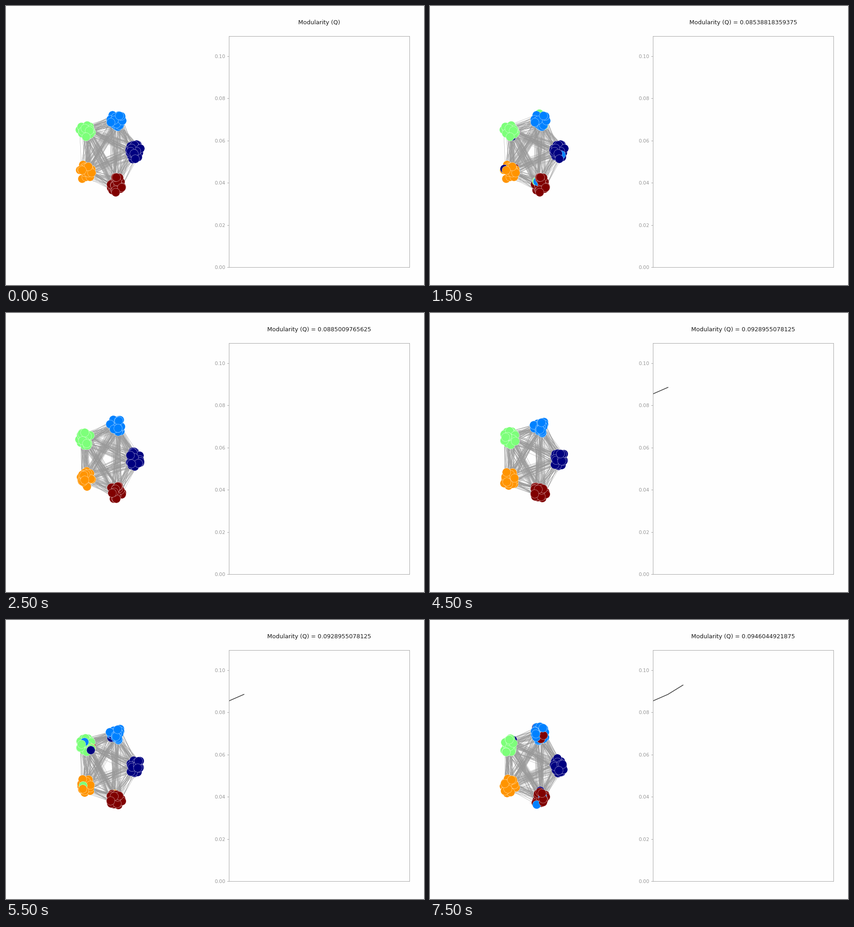
These frames come from a looping animation (917 by 611 pixels, 8000 ms). A matplotlib script:

```python
import numpy as np
import matplotlib.pyplot as plt
from matplotlib.animation import FuncAnimation
from matplotlib.collections import LineCollection

W, H, DPI = 917, 611, 76.4
GROUPS, NODES, EDGES, STRAYS = 5, 128, 640, 11
GREY = "#999999"
BACK = "#fefefe"
Q = [0.08538818359375, 0.0885009765625, 0.0928955078125, 0.0946044921875]
HOME = np.arange(NODES) % GROUPS


def scatter_in(groups, rng):
    """Random places in the oval of each node's group, on a tall pentagon."""
    turn = 2 * np.pi * groups / GROUPS
    angle = rng.uniform(0, 2 * np.pi, len(groups))
    reach = np.sqrt(rng.random(len(groups)))
    x = 223 + 60 * np.cos(turn) + 14 * reach * np.cos(angle)
    y = 319.5 - 75 * np.sin(turn) + 17.5 * reach * np.sin(angle)
    return np.column_stack([x, y])


def layout(step):
    return max(step - 1, 0) // 2


def node_places(step):
    """Settled layout; in restless steps a few nodes visit another group."""
    places = scatter_in(HOME, np.random.default_rng(layout(step)))
    if step == 1 or step and step % 2 == 0:
        rng = np.random.default_rng(100 + step)
        strays = rng.choice(NODES, STRAYS, replace=False)
        hosts = (HOME[strays] + rng.integers(1, GROUPS, STRAYS)) % GROUPS
        places[strays] = scatter_in(hosts, rng)
    return places


PLACES = [node_places(step) for step in range(9)]
LINKS = np.random.default_rng(7).integers(0, NODES, (EDGES, 2))

fig = plt.figure(figsize=(W / DPI, H / DPI), dpi=DPI, facecolor=BACK)

net = fig.add_axes([0, 0, 1, 1])
net.set(xlim=(0, W), ylim=(H, 0))
net.axis("off")
links = LineCollection([], colors=GREY, linewidths=0.45, zorder=1)
net.add_collection(links)
colors = plt.get_cmap("jet")(HOME / (GROUPS - 1))
nodes = net.scatter(*PLACES[0].T, s=300, c=colors, edgecolors="white",
                    linewidths=0.4, zorder=2)

left, right, top, bottom = 489, 885, 66, 572.4
title = net.text((left + right) / 2, 40.4, "", size=12, color="#1a1a1a",
                 ha="center", va="baseline", family="DejaVu Sans")
plot = fig.add_axes([left / W, 1 - bottom / H,
                     (right - left) / W, (bottom - top) / H])
plot.set(xlim=(0, 12), ylim=(0, 0.10943), xticks=[],
         yticks=np.arange(0, 0.11, 0.02), facecolor=BACK)
plot.tick_params(colors=GREY, labelsize=10)
for spine in plot.spines.values():
    spine.set_color(GREY)
curve, = plot.plot([], [], color="#404040", lw=1.5)


def draw(i):
    step = (i + 1) // 2
    points = layout(step)
    links.set_segments(PLACES[step][LINKS])
    nodes.set_offsets(PLACES[step])
    title.set_text("Modularity (Q)" + (f" = {Q[points]}" if step else ""))
    # The curve lags one value behind the title.
    curve.set_data(range(points), Q[:points])
    return links, nodes, title, curve


anim = FuncAnimation(fig, draw, frames=16, interval=500, repeat=True,
                     repeat_delay=0, blit=False)
plt.show()
```
